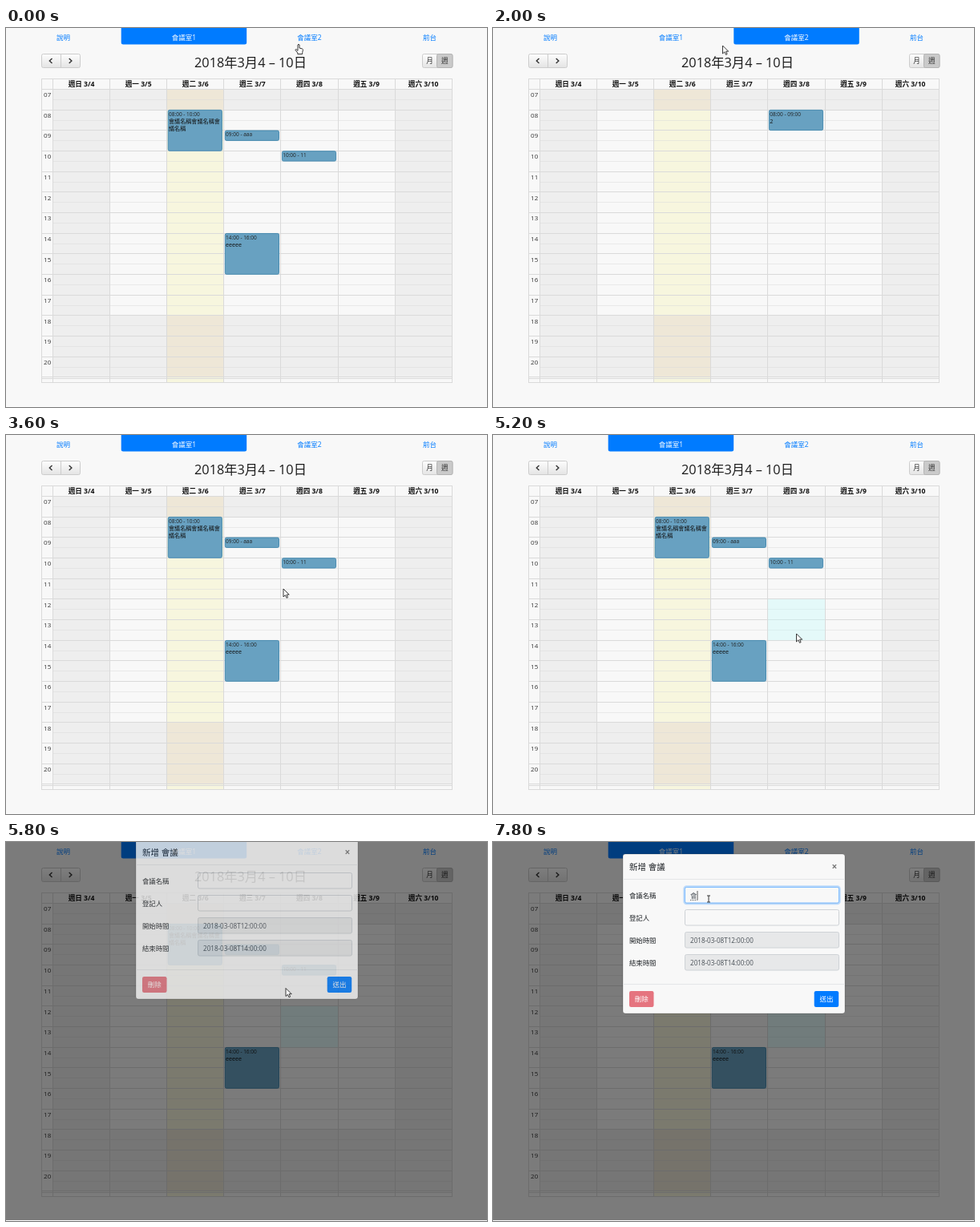
An HTML page that plays this animation: 600x473 px, repeating every 8 s.

```html
<!DOCTYPE html>
<html lang="zh-Hant">
<head>
<meta charset="utf-8">
<style>
html, body { margin: 0; width: 100%; height: 100%; overflow: hidden; background: #f8f8f8; }
svg { display: block; }
text { font-family: "Open Sans", "Noto Sans CJK TC", "Noto Sans CJK", sans-serif; white-space: pre; }
</style>
</head>
<body>
<svg id="stage" width="600" height="473" viewBox="0 0 600 473"></svg>
<script>
const STEP = 200, LOOP = 8000;
const LEFT = 58.5, COL = 71.1, TOP = 76.5, ROW = 25.68, END = 436;
const BLUE = '#007bff';
const colX = i => LEFT + i * COL;
const hourY = h => TOP + (h - 7) * ROW;

const rect = (x, y, w, h, fill, more = '') =>
  `<rect x="${x}" y="${y}" width="${w}" height="${h}" fill="${fill}" ${more}/>`;
const line = (x1, y1, x2, y2, color = '#dadada', more = '') =>
  `<path d="M${x1} ${y1}L${x2} ${y2}" stroke="${color}" ${more}/>`;
const text = (x, y, size, str, fill = '#222', more = '') =>
  `<text x="${x}" y="${y}" font-size="${size}" fill="${fill}" ${more}>${str}</text>`;
const group = (id, body, more = '') => `<g id="${id}" ${more}>${body}</g>`;
const MID = 'text-anchor="middle"', BOLD = 'font-weight="700"';

function tabs(active) {
  return rect(active === 1 ? 143.7 : 300.3, -4, 156.5, 24.5, BLUE, 'rx="2.5"') +
    ['說明', '會議室1', '會議室2', '前台'].map((name, i) =>
      text([71.5, 222, 378.5, 528.5][i], 14.5, 8.5, name, i === active ? '#fff' : BLUE, MID)).join('');
}

function toolbar() {
  const box = 'stroke="#ccc" rx="2"';
  return rect(44.5, 32.5, 48, 17, 'url(#button)', box) + line(68.5, 32.5, 68.5, 49.5, '#ccc') +
    `<path d="M57.5 38L54.3 41L57.5 44M78.7 38L81.9 41L78.7 44" fill="none" stroke="#333" stroke-width="1.4"/>` +
    rect(519.5, 32.5, 37.5, 17, 'url(#button)', box) +
    rect(537.5, 32.5, 19.5, 17, '#cacaca', 'stroke="#b4b4b4" rx="2"') +
    text(528.5, 44.3, 8.6, '月', '#333', MID) + text(547.2, 44.3, 8.6, '週', '#333', MID) +
    text(305, 49, 16.3, '2018年3月4 – 10日', '#1c1c1c', MID);
}

function grid() {
  let out = rect(colX(2), TOP, COL, 366, '#f7f6de');
  for (let d = 0; d < 7; d++) {
    const shade = d === 2 ? '#eee7d7' : '#eeeeee';
    if (d === 0 || d === 6) out += rect(colX(d), TOP, COL, END - TOP, shade);
    else out += rect(colX(d), TOP, COL, ROW, shade) + rect(colX(d), hourY(18), COL, END - hourY(18), shade);
    out += text(colX(d) + COL / 2, 73.2, 8.6, `週${'日一二三四五六'[d]} 3/${d + 4}`, '#111', MID + ' ' + BOLD);
  }
  for (let h = 7; h <= 20; h++) {
    const y = Math.round(hourY(h) - .5) + .5, half = Math.round(hourY(h + .5) - .5) + .5;
    out += line(44.5, y, 556.5, y) +
      line(LEFT, half, 556.5, half, '#d8d8d8', 'stroke-dasharray="1 1"') +
      text(51.7, hourY(h) + 9.6, 8, String(h).padStart(2, '0'), '#333', MID);
  }
  for (let d = 0; d < 7; d++) {
    const x = Math.round(colX(d) - .5) + .5;
    out += line(x, 63.5, x, 442.5);
  }
  return out + line(44.5, 435.5, 556.5, 435.5) + line(44.5, 437.5, 556.5, 437.5) +
    rect(44.5, 63.5, 512, 379, 'none', 'stroke="#dadada"');
}

function meeting(day, from, to, ...lines) {
  const x = colX(day) + 1.7, y = hourY(from);
  return rect(x - .2, y + .2, 67.2, (to - from) * ROW - .5, '#68a1c1', 'rx="1.8" stroke="#3f86ad" stroke-width=".9"') +
    lines.map((s, i) => text(x + .6, y + 7.4 + i * 9.2, i ? 7.1 : 6.5, s, i ? '#111' : '#222')).join('');
}

function field(label, y, value) {
  return text(170, y + 13.3, 8.4, label, '#212529') +
    rect(239.5, y, 192, 19.5, value ? '#e7e8e9' : '#f8f8f8', 'rx="2" stroke="#ced2d6"') +
    text(246, y + 13, 8.1, value, '#495057');
}

function modal() {
  const button = (x, label, fill) =>
    rect(x, 186, 30.5, 20, fill, 'rx="2.2"') + text(x + 15.2, 199.3, 8.5, label, '#fff', MID);
  return rect(162, 15, 277, 199, '#f8f8f8', 'rx="3" stroke="#000" stroke-opacity=".2"') +
    text(170, 35.2, 10.5, '新增 會議', '#212529') +
    text(426, 35, 12, '×', '#777', MID + ' ' + BOLD) +
    line(162.5, 46.5, 438.5, 46.5, '#e4e6e8') + line(162.5, 177.5, 438.5, 177.5, '#e4e6e8') +
    field('會議名稱', 56.5, '') + field('登記人', 84.5, '') +
    field('開始時間', 112.5, '2018-03-08T12:00:00') + field('結束時間', 140.5, '2018-03-08T14:00:00') +
    button(170, '刪除', '#e5747f') + button(400.7, '送出', BLUE) +
    group('focus', rect(238.5, 55.5, 194, 21.5, 'none', 'rx="3" stroke="#007bff" stroke-opacity=".25" stroke-width="2.5"') +
      rect(239.5, 56.5, 192, 19.5, '#f8f8f8', 'rx="2" stroke="#80bdff"') +
      group('typed', text(246, 69.7, 8.4, '會', '#495057') + line(246, 72.5, 254.5, 72.5, '#555', 'stroke-dasharray="1 1"')) +
      group('caret', line(0, 61, 0, 72.5, '#333', 'stroke-width=".8"'))) +
    group('reading', rect(246.5, 78.5, 11, 24, '#fff', 'stroke="#888"') +
      [...'ㄏㄨㄟ'].map((s, i) => text(252, 85.5 + i * 7.7, 7, s, '#222', `${MID} class="key"`)).join(''));
}

const pointers =
  group('arrow', `<path d="M0 0V10L2.4 7.8L4 11.3L5.6 10.6L4.1 7.2H7.2Z" fill="#fff" stroke="#222" stroke-width=".9"/>`) +
  group('hand', `<path d="M-1 1Q0 -.6 1 1V5L4.7 6Q5.6 6.4 5.4 7.6L4.7 10.5V12.5H-1.2V11L-4 7.6Q-4 6.2 -2.7 6.8L-1 8.4Z" fill="#fff" stroke="#222" stroke-width=".9"/>`) +
  group('beam', `<path d="M-2 -4H2M0 -4V4M-2 4H2" fill="none" stroke="#222" stroke-width=".9"/>`);

stage.innerHTML =
  `<defs><linearGradient id="button" x2="0" y2="1"><stop stop-color="#fdfdfd"/><stop offset="1" stop-color="#e4e4e4"/></linearGradient></defs>` +
  rect(0, 0, 600, 473, '#f8f8f8') +
  group('tabs1', tabs(1)) + group('tabs2', tabs(2)) +
  group('calendar', toolbar() + grid() +
    rect(colX(4), hourY(12), COL, 0, '#bff8f8', 'id="selection" opacity=".36"') +
    group('room1',
      meeting(2, 8, 10, '08:00 - 10:00', '會議名稱會議名稱會', '議名稱') +
      meeting(3, 9, 9.5, '09:00 - aaa') + meeting(4, 10, 10.5, '10:00 - 11') +
      meeting(3, 14, 16, '14:00 - 16:00', 'eeeee')) +
    group('room2', meeting(4, 8, 9, '08:00 - 09:00', '2'))) +
  rect(0, 0, 600, 472, '#000', 'id="backdrop"') +
  rect(0, 472, 600, 1, '#fcfcfc') +
  group('dialog', modal()) + group('pointer', pointers);

const $ = id => document.getElementById(id);
const show = (id, on) => { $(id).style.display = on ? '' : 'none'; };
const move = (id, x, y) => $(id).setAttribute('transform', `translate(${x} ${y})`);
const keys = document.querySelectorAll('.key');

// time, x, y of the pointer tip
const path = [[0, 365, 20], [400, 369, 12], [1800, 369, 12], [2000, 286.5, 22], [2200, 255, 13], [2600, 255, 13],
  [3000, 280, 58], [3600, 346, 192], [4200, 381, 206], [4400, 380, 210], [5200, 378.5, 248],
  [5600, 378.5, 248], [5800, 349, 182.5], [6600, 269, 71], [LOOP, 269, 71]];

function pointerAt(t) {
  const i = path.findIndex(p => p[0] > t);
  const [t0, x0, y0] = path[i - 1], [t1, x1, y1] = path[i];
  const k = (t - t0) / (t1 - t0);
  return [x0 + (x1 - x0) * k, y0 + (y1 - y0) * k];
}

function draw(now) {
  const t = Math.floor(now % LOOP / STEP) * STEP;
  const within = (a, b) => t >= a && t < b;
  const second = within(600, 2400);
  show('tabs1', !second);
  show('tabs2', second);
  show('calendar', !within(600, 800) && !within(2400, 2600));
  show('room1', t < 600 || t >= 2800);
  show('room2', within(1000, 2400));

  const [x, y] = pointerAt(t);
  const slots = t < 4400 ? 0 : t >= 5200 ? 4 : Math.ceil((y - hourY(12)) / (ROW / 2));
  $('selection').setAttribute('height', slots * ROW / 2);

  $('backdrop').setAttribute('opacity', t < 5600 ? 0 : t < 5800 ? .22 : .5);
  show('dialog', t >= 5800);
  $('dialog').setAttribute('opacity', t < 6000 ? .78 : 1);
  move('dialog', 0, t < 6000 ? -18 : 0);
  show('focus', t >= 6800);
  show('typed', t >= 7800);
  move('caret', t >= 7800 ? 255 : 246, 0);
  show('reading', within(7200, 7800));
  keys.forEach((key, i) => { key.style.display = t >= 7200 + i * STEP ? '' : 'none'; });

  const kind = y < 21 ? 'hand' : t >= 6000 && y < 77 ? 'beam' : 'arrow';
  ['arrow', 'hand', 'beam'].forEach(name => show(name, name === kind));
  move('pointer', x, y);
}

const start = performance.now();
function tick() {
  draw(performance.now() - start);
  requestAnimationFrame(tick);
}
tick();
</script>
</body>
</html>
```
